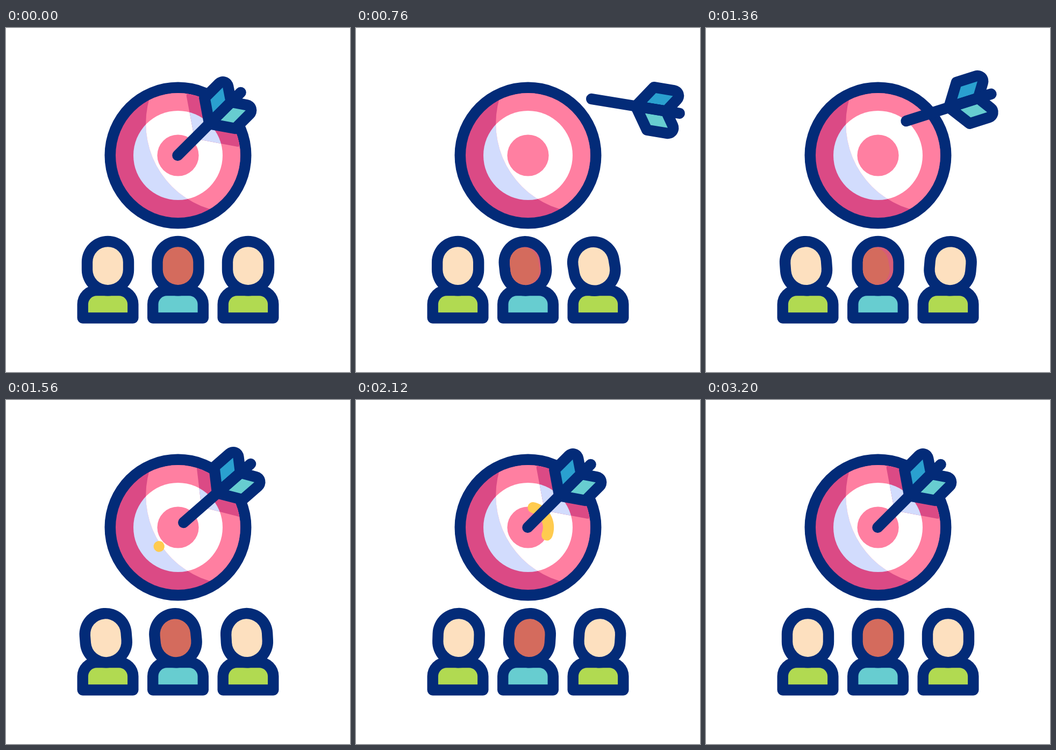
Animation, 640 px wide and 640 px high, one loop 3.6 s. Source, as an HTML page with a canvas:

```html
<!DOCTYPE html>
<html lang="en">
<head>
<meta charset="utf-8">
<title>Target group</title>
<style>
html, body { margin: 0; width: 100%; height: 100%; overflow: hidden; background: #fff; }
canvas { display: block; width: 100vmin; height: 100vmin; }
</style>
</head>
<body>
<canvas id="stage" width="640" height="640"></canvas>
<script>
const ctx = document.getElementById('stage').getContext('2d');
const LOOP = 3600, LINE = 20.4, RAD = Math.PI / 180;
const NAVY = '#032b78', PINK = '#ff7fa1', ROSE = '#db4a85', ICE = '#d2dcfd',
      GOLD = '#ffcb4f', BLUE = '#2aa0cf', TEAL = '#67cdd0', LIME = '#b1da51',
      CREAM = '#fde0bf', BROWN = '#d46b5d', BLUSH = '#d65d78';
const CX = 320, CY = 237;

const clamp = v => Math.min(1, Math.max(0, v));
const mix = (a, b, k) => a + (b - a) * k;
const span = (t, from, to) => clamp((t - from) / (to - from));
const sine = p => (1 - Math.cos(Math.PI * p)) / 2;
const quad = p => p < 0.5 ? 2 * p * p : 1 - 2 * (1 - p) * (1 - p);

function bezier(pts, u) {
  const v = 1 - u, k = [v * v * v, 3 * v * v * u, 3 * v * u * u, u * u * u];
  return [0, 1].map(i => pts.reduce((sum, p, n) => sum + p[i] * k[n], 0));
}

function disc(x, y, r, color) {
  ctx.beginPath();
  ctx.arc(x, y, r, 0, Math.PI * 2);
  ctx.fillStyle = color;
  ctx.fill();
}

// ---- arrow ----
const REST = [388, 168.5], AWAY = [538, 152], TURN = 55, MID = 97;
const OUT = [REST, [428, 120], [505, 114], AWAY];
const BACK = [AWAY, [493, 120], [439, 156], REST];

function arrowPose(t) {
  if (t < 1020) {
    const u = t < 520 ? 0.925 * sine(t / 520) : mix(0.925, 1, sine(span(t, 520, 1020)));
    return { at: bezier(OUT, u), turn: TURN * (1 - Math.pow(1 - u, 1.35)) };
  }
  const v = sine(span(t, 1020, 1700)), w = 1 - v;
  return { at: bezier(BACK, v), turn: TURN * (w - 0.05 * Math.sin(2 * Math.PI * w)) };
}

// x runs from the tip along the shaft
function inArrow(pose, draw) {
  ctx.save();
  ctx.translate(pose.at[0], pose.at[1]);
  ctx.rotate((pose.turn - 45) * RAD);
  ctx.translate(-MID, 0);
  draw();
  ctx.restore();
}

function shadowPath() {
  ctx.beginPath();
  ctx.moveTo(44.2, 0);
  ctx.arcTo(92, -70, 220, -70, 10);
  ctx.lineTo(220, -70);
  ctx.lineTo(220, 70);
  ctx.arcTo(92, 70, 44.2, 0, 10);
  ctx.closePath();
}

function feather(side, color) {
  ctx.beginPath();
  ctx.moveTo(83.4, 0);
  ctx.lineTo(111, side * 40.3);
  ctx.arcTo(167.8, side * 40.3, 140.6, 0, 10);
  ctx.lineTo(140.6, 0);
  ctx.closePath();
  ctx.fillStyle = color;
  ctx.fill();
  ctx.stroke();
}

function arrow() {
  ctx.strokeStyle = NAVY;
  ctx.lineWidth = LINE;
  feather(-1, BLUE);
  feather(1, TEAL);
  ctx.beginPath();
  ctx.moveTo(0, 0);
  ctx.lineTo(165.8, 0);
  ctx.stroke();
}

// ---- target ----
function shades() {
  disc(CX, CY, 117, ROSE);
  disc(CX, CY, 83, ICE);
}

function target(pose) {
  disc(CX, CY, 136.5, NAVY);
  ctx.save();
  ctx.beginPath();
  ctx.arc(CX, CY, 116, 0, Math.PI * 2);
  ctx.clip();
  shades();
  ctx.save();
  ctx.beginPath();
  ctx.arc(426, 177.7, 165.8, 0, Math.PI * 2);
  ctx.clip();
  disc(CX, CY, 117, PINK);
  disc(CX, CY, 83, '#fff');
  ctx.restore();
  ctx.save();
  inArrow(pose, shadowPath);
  ctx.clip();
  shades();
  ctx.restore();
  disc(CX, CY, 38.6, PINK);
  ctx.restore();
}

// A trimmed arc running counter-clockwise; curl widens its beginning
function streak(t, start, headTime, tailTime, from, sweep, radius, curl) {
  if (t <= start || t >= start + tailTime) return;
  const head = sweep * quad(span(t, start, start + headTime));
  const tail = sweep * quad(span(t, start, start + tailTime));
  ctx.beginPath();
  for (let i = 0; i <= 60; i++) {
    const d = mix(tail, head, i / 60);
    const r = radius + curl * Math.max(0, 1 - d / 60);
    const a = (from - d) * RAD;
    ctx.lineTo(CX + r * Math.cos(a), CY + r * Math.sin(a));
  }
  ctx.strokeStyle = GOLD;
  ctx.lineWidth = LINE;
  ctx.stroke();
}

// ---- people ----
const SWAY = [0, -9.5, 7.5, -5.5, 3.7, -2.5, 0];

function sway(t) {
  if (t <= 0) return 0;
  if (t < 500) return SWAY[1] * sine(t / 500);
  const n = 1 + Math.floor((t - 500) / 480);
  if (n >= SWAY.length - 1) return 0;
  return mix(SWAY[n], SWAY[n + 1], sine((t - 500) / 480 % 1));
}

function facePath(x, tilt, grow) {
  ctx.save();
  ctx.translate(x, 490);
  ctx.rotate(tilt * RAD);
  ctx.beginPath();
  ctx.roundRect(-28.3 - grow, -82.8 - grow, 56.6 + 2 * grow, 70.8 + 2 * grow, 28.3 + grow);
  ctx.restore();
}

function person(x, tilt, skin, shirt, blush) {
  ctx.strokeStyle = NAVY;
  ctx.lineWidth = LINE;
  ctx.beginPath();
  ctx.roundRect(x - 46.8, 488.1, 93.6, 51.4, [26, 26, 0, 0]);
  ctx.fillStyle = shirt;
  ctx.fill();
  ctx.stroke();

  facePath(x, tilt, LINE);
  ctx.fillStyle = NAVY;
  ctx.fill();
  facePath(x, tilt, 0);
  ctx.fillStyle = blush ? BLUSH : skin;
  ctx.fill();
  if (blush) {
    ctx.save();
    ctx.clip();
    facePath(x, SWAY[1], 0);
    ctx.fillStyle = skin;
    ctx.fill();
    ctx.restore();
  }
}

function draw(t) {
  const pose = arrowPose(t);
  ctx.fillStyle = '#fff';
  ctx.fillRect(0, 0, 640, 640);
  ctx.lineCap = ctx.lineJoin = 'round';
  target(pose);
  streak(t, 1550, 740, 1165, 135, 235, 38, 12);
  streak(t, 2130, 700, 1060, -45, 280, 82, 0);
  inArrow(pose, arrow);
  person(189.5, sway(t), CREAM, LIME, false);
  person(320, sway(t - 120), BROWN, TEAL, t > 620 && t < 1400);
  person(450.5, sway(t - 240), CREAM, LIME, false);
}

function tick() {
  draw(performance.now() % LOOP);
  requestAnimationFrame(tick);
}
tick();
</script>
</body>
</html>
```
